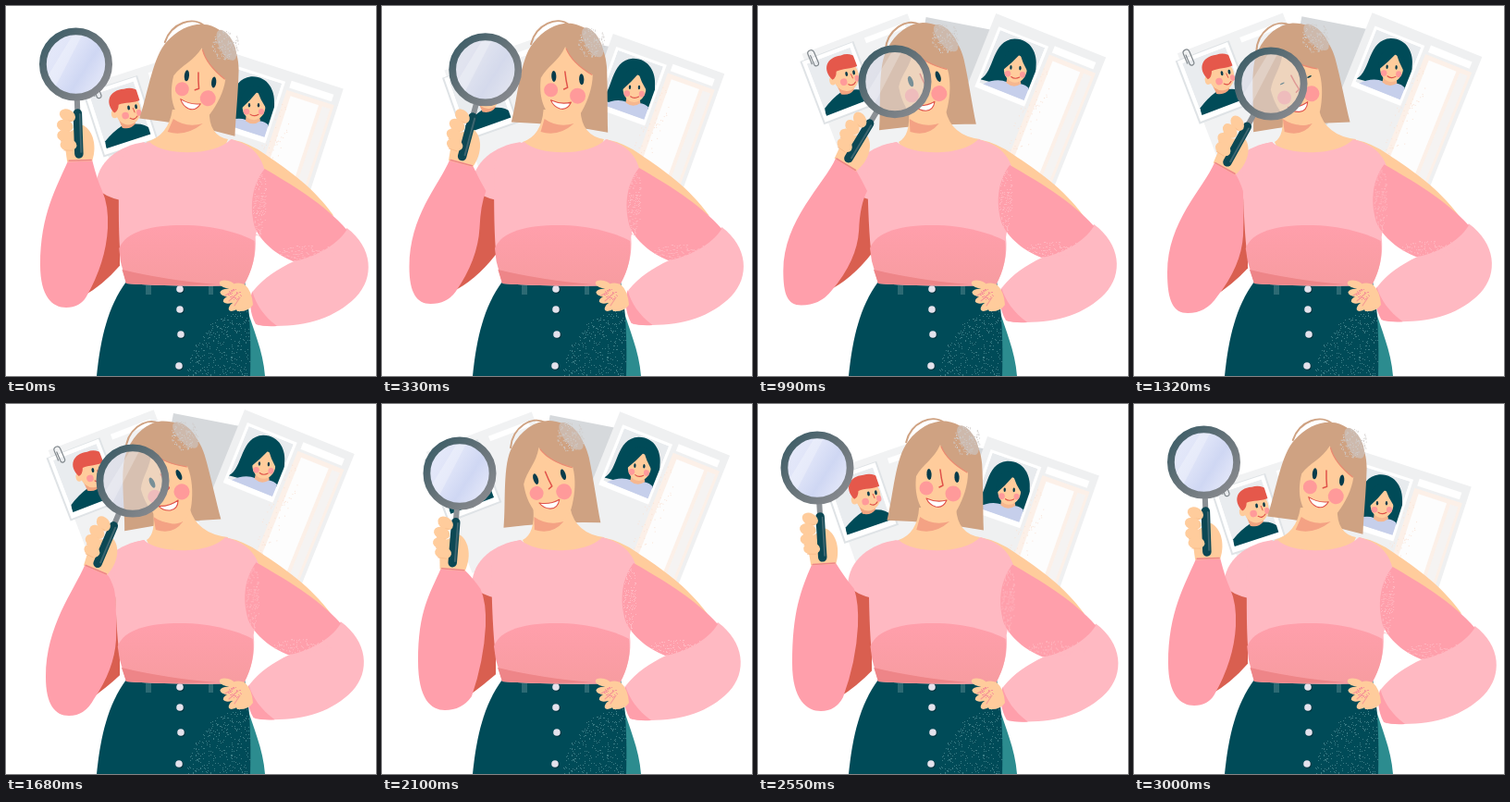
An HTML page with a canvas that plays this animation: 400 px wide and 400 px high, repeating every 3.03 s.

```html
<!DOCTYPE html>
<html lang="en">
<head>
<meta charset="utf-8">
<title>Searching profiles</title>
<style>
html, body { margin: 0; width: 100%; height: 100%; overflow: hidden; background: #fff; }
canvas { display: block; width: 400px; height: 400px; }
</style>
</head>
<body>
<canvas id="stage" width="400" height="400"></canvas>
<script>
const g = document.getElementById('stage').getContext('2d');
const LOOP = 3030, STEP = 30;
const SKIN = '#ffcc9c', HAIR = '#cfa282', TEAL = '#004b58', LIGHT = '#ffb9c2', PINK = '#ff9fab',
  CORAL = '#d95f50', RED = '#e0524a', BLUSH = '#ff9a9a', INK = '#083c4b';

// lens x, y, turn | face turn | paper lift | body sway | sleeve: side x, y, bottom x, y, inner x, y, tip x, y
const times = [0, 660, 1320, 1680, 2100, 2550, 3000];
const poses = [
  [75.5, 63, -2, 8, 0, 5, 37, 280, 65, 326, 110, 240, 87, 314],
  [148, 77, 32, -10, .93, 2, 22, 285, 40, 318, 101, 240, 72, 304],
  [148, 84, 29, -20, .97, -1, 36, 288, 58, 332, 118, 248, 90, 314],
  [137, 83, 23, -22, 1, -1, 43, 295, 68, 337, 119, 255, 95, 319],
  [84, 75, 4.6, -15, .95, 0, 39, 278, 68, 331, 112, 240, 97, 316],
  [64, 69, -3.4, 0, .34, 2, 37, 280, 68, 332, 108, 240, 92, 317]
];
poses.push(poses[0]);

// smooth curve through the poses without overshoot
function poseAt(t) {
  t = Math.min(t, 3000);
  let i = 0;
  while (i < 5 && t >= times[i + 1]) i++;
  const h = times[i + 1] - times[i], x = (t - times[i]) / h;
  return poses[0].map((_, c) => {
    const rate = k => (poses[k + 1][c] - poses[k][c]) / (times[k + 1] - times[k]);
    const slope = k => {
      if (k === 0 || k === 6) return 0;
      const a = rate(k - 1), b = rate(k);
      return a * b <= 0 ? 0 : 2 * a * b / (a + b);
    };
    const p = poses[i][c], q = poses[i + 1][c], e = x * x * (3 - 2 * x);
    return p + (q - p) * e + h * x * (1 - x) * ((1 - x) * slope(i) - x * slope(i + 1));
  });
}

const clamp = v => Math.max(0, Math.min(1, v));
function fill(d, color) { g.fillStyle = color; g.fill(new Path2D(d)); }
function line(d, color, width) {
  g.strokeStyle = color; g.lineWidth = width; g.lineCap = g.lineJoin = 'round';
  g.stroke(new Path2D(d));
}
function oval(x, y, rx, ry, color, turn = 0) {
  g.beginPath(); g.ellipse(x, y, rx, ry, turn, 0, 7);
  g.fillStyle = color; g.fill();
}
function box(x, y, w, h, color) { g.fillStyle = color; g.fillRect(x, y, w, h); }
function group(x, y, deg, draw) {
  g.save(); g.translate(x, y); g.rotate(deg * Math.PI / 180); draw(); g.restore();
}
function shade(x0, y0, x1, y1, ...colors) {
  const s = g.createLinearGradient(x0, y0, x1, y1);
  colors.forEach((c, i) => s.addColorStop(i / (colors.length - 1), c));
  return s;
}
function grain(n, x, y, rx, ry, color) {
  let seed = 7;
  const rnd = () => (seed = seed * 16807 % 2147483647) / 2147483647;
  rnd(); g.fillStyle = color;
  while (n--) {
    const a = rnd() * 6.283, r = Math.sqrt(rnd());
    g.fillRect(Math.round(x + rx * r * Math.cos(a)), Math.round(y + ry * r * Math.sin(a)), 1, 1);
  }
}
function clipBox(x, y, w, h) { g.beginPath(); g.rect(x, y, w, h); g.clip(); }

function boy() {
  box(0, -9, 58, 70, '#fff');
  clipBox(4, -5, 50, 60);
  box(4, -5, 50, 60, '#e9ecef');
  fill('M3 56 L5 47 Q16 40 27 37 L41 39 Q52 42 56 50 V56Z', TEAL);
  fill('M26 28 L27 39 Q35 44 42 39 L41 28Z', '#f2a47f');
  group(38, 20, 10, () => {
    g.scale(1.15, 1.15);
    oval(1, 2, 12, 14, SKIN);
    oval(-12, 4, 3, 4, SKIN);
    fill('M-12 3 C-20 -8 -14 -19 0 -18 C9 -20 18 -13 15 -6 C7 -3 -1 -6 -7 -4 Q-8 2 -12 3Z', '#e5584b');
    oval(2, 0, 1.2, 2.2, INK); oval(9, 0, 1.2, 2.2, INK);
    oval(-2, 7, 3.3, 3.3, BLUSH); oval(11, 6, 2.3, 3, BLUSH);
    line('M2 10 Q6 13 9 9', RED, 1);
    line('M6 1 L7 5', RED, .8);
  });
}

function girl() {
  box(8, 12, 58, 70, '#fff');
  clipBox(11, 15, 52, 61);
  box(11, 15, 52, 61, '#e8ebee');
  group(37, 46, -18, () => {
    fill('M-33 17 C-18 8 -24 -26 1 -29 C19 -30 27 -14 26 0 Q26 14 28 26 L2 24 Q-18 20 -33 17Z', TEAL);
    fill('M-34 42 L-30 22 Q-16 14 -4 18 L10 19 Q24 20 28 42Z', '#c6cfeb');
    fill('M-4 10 L-5 19 Q3 25 11 19 L9 10Z', '#f6b78f');
    oval(4, 3, 12.5, 15, SKIN);
    fill('M-10 6 C-13 -16 2 -21 8 -18 C18 -15 19 -4 17 5 Q11 -4 8 -13 Q0 -3 -10 6Z', TEAL);
    oval(-1, 2, 1.2, 2.3, INK); oval(9, 2, 1.2, 2.3, INK);
    oval(-4, 9, 3.3, 3.3, BLUSH); oval(12, 9, 3, 3.3, BLUSH);
    line('M0 12 Q4 15 9 12', RED, 1.1);
    line('M24 16 L25 27', RED, 1.4);
  });
}

function papers(u) {
  group(195 - 14 * u, 52 - 42 * u, 11, () => box(0, 0, 72, 110, '#d6d9dc'));
  group(88 - 39 * u, 103 - 36 * u, -18 - 3 * u, () => {
    box(3, -17, 122, 140, '#f1f2f3');
    box(72, -9, 46, 6, '#fff');
    box(-2, -10, 62, 73, '#dfe3e6');
    g.save(); boy(); g.restore();
    group(12, -8, -2, () =>
      line('M-3 5 V-6 A3.5 3.5 0 0 1 4 -6 V7 A2.6 2.6 0 0 1 -1 7 V-4', '#7f868b', 1.2));
  });
  group(243 + 15 * u, 50 - 44 * u, 18 + 4 * u, () => {
    box(0, 0, 128, 180, '#eff0f1');
    box(70, 20, 54, 160, '#fcf0e8');
    box(72, 9, 48, 8, '#fff');
    box(76, 25, 32, 155, '#fdfdfd');
    box(112, 25, 9, 155, '#f5f3f2');
    grain(70, 74, 90, 12, 60, '#fae3d6');
    g.save(); girl(); g.restore();
  });
}

function hair(h) {
  group(186 + .8 * h, 131, .9 * h, () => {
    g.translate(-186, -131);
    line('M146 45 C149 23 171 11 185 20', HAIR, 2);
    fill('M134 131 C138 105 136 62 148 44 C158 27 173 18 188 18 C212 20 226 38 230 60 C234 85 236 110 239 131 Q190 127 134 131Z', HAIR);
    oval(212, 36, 8, 18, '#cdb9ac', -.65);
    grain(120, 211, 36, 15, 16, '#d0ccca');
  });
}

function neck(n) {
  const m = n * .6;
  fill(`M${167 + n} 112 Q${168 + m} 140 152 147 L160 164 H232 L240 144 Q${211 + m} 140 ${207 + n} 112Z`, SKIN);
  fill(`M${168 + n} 122 Q${182 + n} 132 ${200 + n} 127 Q${186 + m} 142 ${167 + m} 136Z`, '#f4a284');
}

function face(turn, lid) {
  group(195, 150, turn, () => {
    g.translate(-195, -150);
    fill('M197 44 C190 60 178 65 171 78 C169 96 173 114 187 124 C197 131 209 127 216 113 C222 102 227 88 227 74 C213 67 202 57 197 44Z', SKIN);
    line('M198 46 C203 58 214 67 226 74', '#ea8a72', 1.2);
    oval(182, 91, 7.5, 7.5, BLUSH); oval(211, 97, 8.5, 8.5, BLUSH);
    oval(185, 76, 2.6, 5.2 * lid + .8, INK, -.05);
    oval(215, 79, 2.6, 5.2 * lid + .8, INK, -.05);
    line('M197 71 Q198 80 200 88 L196 90', RED, 1.5);
    fill('M182 102 Q193 107 204 104 Q200 113 192 111 Q185 109 182 102Z', '#fff');
    line('M182 102 Q193 107 204 104 Q200 113 192 111 Q185 109 182 102', RED, 1.1);
  });
}

// the hair and neck follow the face by about two thirds
function head(turn, lid) {
  const h = (turn + 10) * .65;
  hair(h); neck(h * 1.1); face(turn, lid);
}

function skirt() {
  const cloth = 'M130 298 H258 C264 328 265 365 264 400 H98 C102 360 110 325 130 298Z';
  fill('M260 325 C267 350 278 372 280 400 H260Z', '#2c8c8f');
  fill(cloth, TEAL);
  g.save();
  g.clip(new Path2D(cloth));
  grain(1000, 258, 398, 62, 68, '#3a7d86');
  g.restore();
  box(151, 302, 6, 10, '#2c6a74'); box(219, 302, 5, 10, '#2c6a74');
  [[188, 306], [188, 328], [189, 355], [187, 389]].forEach(([x, y]) => {
    oval(x + .8, y + .8, 4, 4, '#00343f');
    oval(x, y, 3.8, 3.8, '#e4e2ec');
  });
}

function sleeve(p, [wl, wr], front) {
  const [lx, ly, bx, by, ix, iy, tx, ty] = p;
  const sx = 104 + 14 * front;
  fill(`M101 196 L123 205 V${ty - .95 * (122 - tx)} Q${(tx + 122) / 2} ${ty - 12} ${tx - 4} ${ty}Z`, CORAL);
  fill('M150 147 C122 151 98 168 97 196 Q106 206 124 210Z', LIGHT);
  fill(`M${wl} C${wl[0] - 12} ${wl[1] + 28} ${lx} ${ly - 55} ${lx} ${ly}
    C${lx} ${by - 12} ${bx - 15} ${by} ${bx} ${by}
    Q${(bx + tx) / 2 + 4} ${by} ${tx} ${ty}
    Q${ix - 2} ${(iy + ty) / 2} ${ix} ${iy}
    Q${ix + 1} 215 ${sx} 200
    Q${(wr[0] + sx) / 2} 188 ${wr}Z`, PINK);
}

function torso() {
  fill('M150 147 C132 151 118 156 118 180 C119 220 120 250 123 272 L130 300 Q190 304 257 302 C266 285 270 268 268 250 C272 225 276 200 275 176 C270 160 260 150 238 144 C222 162 168 163 150 147Z', LIGHT);
  fill('M121 262 C128 242 160 236 195 237 C230 238 256 248 267 254 C269 270 266 286 257 302 Q190 304 130 300 L123 276Z',
    shade(0, 240, 0, 302, '#ff9fab', '#f79ca0'));
  fill('M125 285 Q170 296 228 301 Q170 303 130 300Z', '#ee8588');
}

function rightArm() {
  fill('M363 236 C392 257 395 290 375 311 C350 337 312 345 270 341 C262 330 260 315 264 304 C275 290 290 280 307 272 C330 262 350 255 363 236Z', LIGHT);
  fill('M263 304 C267 318 276 331 291 342 Q278 343 268 340 C261 328 260 315 263 304Z', PINK);
  fill('M272 172 C300 188 338 210 363 238 C352 256 328 268 306 272 C288 265 270 251 263 234 C256 210 260 188 272 172Z', PINK);
  grain(140, 268, 210, 7, 36, LIGHT);
  grain(120, 322, 262, 32, 8, LIGHT);
}

function hipHand() {
  fill('M240 303 Q250 297 258 301 Q266 308 267 323 Q262 331 250 330 L243 318Z', SKIN);
  [[239, 301, .25], [240, 310, .05], [243, 317, -.3], [248, 324, -.6]].forEach(([x, y, a]) =>
    oval(x, y, 8.5, 4.2, SKIN, a));
  line('M237 313 L247 307 M241 319 L251 310 M247 324 L253 315', '#f59a94', 1.1);
  grain(40, 248, 311, 8, 6, '#f7929a');
}

function magnifier(x, y, turn, headTurn, lid) {
  group(x, y, turn, () =>
    fill('M-13 105 L-16 76 L5 66 C14 70 21 86 14 105Z', SKIN));
  g.save();
  g.beginPath(); g.arc(x, y, 33, 0, 7); g.clip();
  box(x - 34, y - 34, 68, 68, shade(x - 28, y - 18, x + 28, y + 18, '#e4e8f9', '#dfe4f8', '#cfd7f3', '#e2e6f8'));
  head(headTurn, lid);
  g.globalAlpha = .52 * clamp((x - 88) / 35);
  box(x - 34, y - 34, 68, 68, '#dedcdd');
  g.globalAlpha = .25;
  fill(`M${x - 30} ${y + 12} L${x - 2} ${y - 34} H${x + 8} L${x - 22} ${y + 24}Z`, '#fff');
  g.restore();
  group(x, y, turn, () => {
    line('M0 39 V52', '#8b9095', 6);
    line('M0 53 V97', '#0c4854', 9.5);
    line('M2.5 54 V95', '#3d6670', 2);
  });
  g.beginPath(); g.arc(x, y, 35.6, 0, 7);
  g.lineWidth = 7.8; g.strokeStyle = shade(x - 28, y - 28, x + 28, y + 28, '#42606a', '#68747a', '#85888d');
  g.stroke();
  group(x, y, turn, () => {
    [[-11, 55, .5], [-14, 66, .3], [-14, 77, .2], [-11, 87, .1]].forEach(([fx, fy, a]) => {
      oval(fx, fy, 9, 6.5, SKIN, a);
      line(`M${fx - 5} ${fy + 5.5} L${fx + 4} ${fy + 6}`, '#f6b787', .7);
    });
  });
}

function draw(t) {
  const [x, y, turn, headTurn, lift, sway, ...arm] = poseAt(t);
  const lid = clamp(Math.abs(t - 1320) / 110);
  const r = turn * Math.PI / 180, c = Math.cos(r), s = Math.sin(r);
  const cuff = k => [x - 104 * s + k * c, y + 104 * c + k * s];

  box(0, 0, 400, 400, '#fff');
  papers(lift);
  head(headTurn, lid);
  skirt();

  const k = -sway / 150;
  const lean = f => { g.save(); g.transform(1, 0, k, 1, -k * 300, 0); f(); g.restore(); };
  lean(() => fill('M238 144 Q258 148 275 160 C302 178 330 197 352 227 L300 205 L262 170Z', SKIN));
  sleeve(arm, [cuff(-12), cuff(14)], clamp(turn / 25));
  lean(() => {
    torso();
    g.translate(sway * .7, sway * .8);
    rightArm();
  });
  hipHand();
  magnifier(x, y, turn, headTurn, lid);
  line(`M${cuff(-11)} L${cuff(13)}`, '#ee8588', 1.6);
}

const start = performance.now();
function tick() {
  const t = (performance.now() - start) % LOOP;
  draw(Math.floor(t / STEP) * STEP);
  requestAnimationFrame(tick);
}
tick();
</script>
</body>
</html>
```
